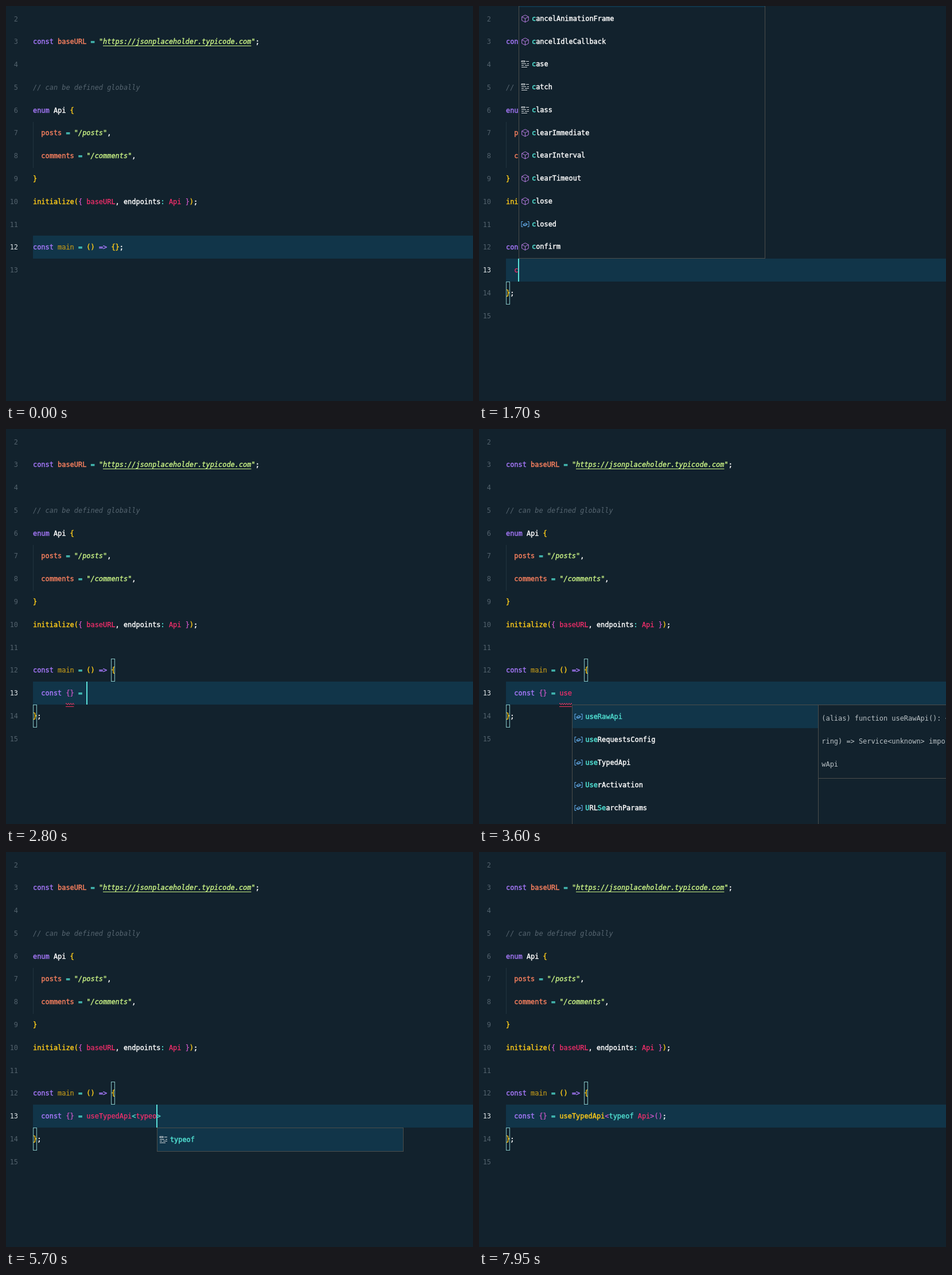
An HTML page that plays this animation: 814x688 px, repeating every 8000 ms.

```html
<!DOCTYPE html>
<html lang="en">
<head>
<meta charset="utf-8">
<title>Typed API editor</title>
<style>
html, body { margin: 0; width: 100%; height: 100%; overflow: hidden; background: #12222d; }
#ed { position: absolute; inset: 0; overflow: hidden; color: #fff; white-space: pre;
  font: 11.93px/41px "DejaVu Sans Mono", monospace; -webkit-text-stroke: .4px currentColor; }
#ed div, #ed svg { position: absolute; box-sizing: border-box; }
b { font-weight: 400; }
.num { left: 0; width: 21px; text-align: right; color: #52616c; -webkit-text-stroke: 0; }
.num.on { color: #dde3e6; }
.line { left: 47px; }
.now { left: 47px; right: 0; height: 40px; background: #113549; }
.guide { left: 47px; top: 202px; width: 1px; height: 79.5px; background: #22343f; }
.pair { width: 7px; height: 40px; border: 1px solid #86c5c5; }
.caret { width: 2px; height: 40px; background: #5ce0d8; }
.k { color: #a678fa; } .o { color: #f9805f; } .c { color: #4fdccf; } .g { color: #ffcc1a; }
.m { color: #b8921a; } .r { color: #fb2f6d; } .p { color: #cf58ca; } .w { color: #fff; }
.m, .r, .p { -webkit-text-stroke-width: .25px; }
.s, .i, .u { color: #c9f285; } .i, .u { font-style: italic; }
.u { text-decoration: underline; text-underline-offset: 2.5px; text-decoration-thickness: 1px; }
.n { color: #566570; font-style: italic; -webkit-text-stroke: 0; }
.pop, .info { background: #12222d; border: 1px solid #4b4d4b; overflow: hidden; }
.pop { width: 430px; }
.row { left: 0; width: 100%; height: 39.77px; padding-left: 22px; }
.row.sel { background: #113549; color: #4fdccf; }
.row svg { left: 3px; top: 13px; }
.row b { color: #4fdccf; -webkit-text-stroke: .55px; }
.row s { color: #a3abb0; }
.bar { right: 0; top: 0; width: 10px; background: #14364b; }
.info { padding: 4px 5px; line-height: 39.8px; color: #b9c1c5; -webkit-text-stroke: 0; }
svg { fill: none; }
</style>
</head>
<body>
<div id="ed"></div>
<script>
const LOOP = 8000, CH = 7.183, ROW = 39.77;
const ed = document.getElementById("ed");
const x = col => 47 + col * CH;
const y = line => 2.6 + (line - 2) * ROW;
const esc = s => s.replace(/&/g, "&amp;").replace(/</g, "&lt;");
const box = (cls, left, top, body = "", css = "") =>
  `<div class="${cls}" style="left:${left}px;top:${top}px;${css}">${body}</div>`;

// Tokens are separated by "~"; the first letter is the colour class.
const paint = src => src.split("~").map(s => `<b class="${s[0]}">${esc(s.slice(1))}</b>`).join("");

const code = {
  3: 'kconst~w ~obaseURL~c = ~s"~uhttps://jsonplaceholder.typicode.com~s"~w;',
  5: "n// can be defined globally",
  6: "kenum~w Api ~g{",
  7: 'w  ~oposts~c = ~s"~i/posts~s"~w,',
  8: 'w  ~ocomments~c = ~s"~i/comments~s"~w,',
  9: "g}",
  10: "ginitialize(~p{ ~rbaseURL~w, endpoints~c: ~rApi~p }~g)~w;"
};

const icons = {
  f: '<path stroke="#b57be0" d="M7.5 .8l5.800 3v6.400l-5.800 3l-5.800-3v-6.400zM1.700 3.800l5.800 3l5.800-3M7.5 6.800v6.400"/>',
  k: '<path stroke="#d5dadd" d="M1 1.500h6v2h-6zM9 2.500h5M1 6.500h8M11 6.500h3M1 9.500h4M7 9.500h7M1 12.500h10"/>',
  v: '<path stroke="#68b4f5" d="M3.500 2.500h-2.500v9h2.500M11.500 2.500h2.500v9h-2.500M4 7.500l4-2.500l3 1.500v1.500l-4 2l-3-1zM4 7.500l3 1l4-2"/>'
};

// Each entry starts with its icon letter; "_" switches match highlighting.
const lists = {
  c: "fcaches fcancelAnimationFrame fcancelIdleCallback kcase kcatch kclass fclearImmediate fclearInterval fclearTimeout fclose vclosed fconfirm",
  co: "vconsole kconst kcontinue fconfirm vcookieStore vConvolverNode vConstantSourceNode vCountQueuingStrategy vCompressionStream vComment vCloseEvent vCryptoKey",
  con: "kconst vconsole kcontinue fconfirm vConvolverNode vConstantSourceNode",
  cons: "kconst vconsole vConstantSourceNode",
  u: "vuseRawApi vuseRequestsConfig vuseTypedApi vundefined funescape vUserActivation vURL vURLSearchParams vUint8Array vUint16Array vUint32Array vUIEvent",
  use: "vuseRawApi vuseRequestsConfig vuseTypedApi vUserActivation v_U_RL_Se_archParams vSuppressedError",
  useT: "vuseTypedApi",
  t: "kthis kthrow ktrue ktry ktypeof vtoolbar vtop vText vTextDecoder vTextEncoder vTouch vTypeError",
  ty: "ktypeof vTypeError ktype v_T_ext_Tr_ack v_T_ouchEvent v_T_reeWalker",
  typeof: "ktypeof",
  Api: "v_Api_ vuseRaw_Api_ vuseTyped_Api_ v_A_ud_i_o_P_aram v_A_ud_i_o_P_aramMap -AudioProcessingEvent v_A_n_i_mation_P_laybackEvent v_A_syncD_i_s_p_osableStack v_A_uthent_i_catorRes_p_onse vOffline_A_ud_i_oCom_p_letionEvent vSVGPreserve_A_s_p_ectRat_i_o v_A_uthent_i_catorAssertionRes_p_onse"
};

const rawInfo = ["(alias) function useRawApi(): <", "ring) => Service<unknown> import", "wApi"];
const typedInfo = ["(alias) function useTypedApi<T", "import useTypedApi"];

const lhs = "w  ~kconst~w ~p{}";
const eq = lhs + "~c = ";
const hook = eq + "~ruseTypedApi";
const typeArg = hook + "~c<typeof ~rApi~c>";
const inner = [[13, 8], [13, 9]], call = [[13, 36], [13, 37]];

// time, line 13, caret column, options
const steps = [
  [1050, "w  ", 2],
  [1500, "w  ~rc", 3, { list: "c", q: 1 }],
  [1750, "w  ~rco", 4, { list: "co", q: 2 }],
  [1900, "w  ~rcon", 5, { list: "con", q: 3, below: 1 }],
  [2000, "w  ~rcons", 6, { list: "cons", q: 4, below: 1 }],
  [2100, "w  ~kconst", 7, { list: "cons", q: 5, below: 1 }],
  [2200, "w  ~kconst~w ", 8],
  [2350, lhs, 9, { pairs: inner, wave: [8, 2] }],
  [2500, lhs, 10, { pairs: inner, wave: [8, 2] }],
  [2600, lhs + "~w ", 11, { wave: [8, 2] }],
  [2700, lhs + "~c =", 12, { wave: [8, 2] }],
  [2750, eq, 13, { wave: [8, 2] }],
  [3000, eq + "~ru", 14, { list: "u", q: 1 }],
  [3050, eq + "~rus", 15, { list: "use", q: 2, below: 1 }],
  [3100, eq + "~ruse", 16, { list: "use", q: 3, below: 1, info: rawInfo, wave: [13, 3] }],
  [3700, eq + "~ruseT", 17, { list: "useT", q: 4, below: 1, info: typedInfo, wave: [13, 4] }],
  [3900, eq + "~ruseTy", 18, { list: "useT", q: 5, below: 1, info: typedInfo, wave: [13, 5] }],
  [4150, hook, 24],
  [4900, hook + "~c<>", 25, { wave: [24, 2] }],
  ...["t", "ty", "typ", "type", "typeo", "typeof"].map((s, i) => [5300 + i * 90, `${hook}~c<~${s == "typeof" ? "c" : "r"}${s}~c>`, 26 + i,
    { list: i > 2 ? "typeof" : i ? "ty" : "t", q: i + 1, below: i > 0 }]),
  [5950, hook + "~c<typeof >", 32, { wave: [32, 1] }],
  [6150, hook + "~c<typeof ~rA~c>", 33, { list: "Api", bar: 1, wave: [33, 1] }],
  [6200, hook + "~c<typeof ~rAp~c>", 34, { list: "Api", bar: 1, wave: [34, 1] }],
  [6250, typeArg, 35, { list: "Api", bar: 1, info: [], wave: [35, 1] }],
  [6850, typeArg, 35, { wave: [35, 1] }],
  [7000, typeArg, 36],
  [7200, typeArg + "~p()", 37, { pairs: call }],
  [7350, typeArg + "~p()", 38, { pairs: call }],
  [7450, typeArg + "~p()~w;", 39, { pairs: call }],
  [7600, eq + "~guseTypedApi~p<~ctypeof ~rApi~p>()~w;", 39]
].map(([t, src, col, opt = {}]) => ({ t, src, col, ...opt }));

// The blink restarts whenever the caret moves.
steps.forEach((s, i) => s.key = i && steps[i - 1].col == s.col ? steps[i - 1].key : s.t);

function label(name, q) {
  if (name.includes("_")) return name.split("_").map((s, i) => i % 2 ? `<b>${s}</b>` : s).join("");
  return q ? `<b>${name.slice(0, q)}</b>${name.slice(q)}` : name;
}

function popup(s) {
  const rows = lists[s.list].split(" "), h = rows.length * ROW + 2;
  const left = x(s.col) + .4, top = s.below ? 480 : 440.2 - h;
  const body = rows.map((r, i) => {
    const old = r[0] == "-", text = label(r.slice(1), s.q);
    const icon = `<svg width="15" height="15">${icons[old ? "v" : r[0]]}</svg>`;
    return box("row" + (i ? "" : " sel"), 0, i * ROW, icon + (old ? `<s>${text}</s>` : text));
  }).join("") + (s.bar ? `<div class="bar" style="height:${371 - top}px"></div>` : "");
  let out = box("pop", left, top, body, `height:${h}px`);
  if (s.info) {
    const tall = s.below ? s.info.length * ROW + 9.6 : 44;
    out += box("info", left + 429, s.below ? top : -1, esc(s.info.join("\n")), `width:300px;height:${tall}px`);
  }
  return out;
}

function wave([col, n]) {
  const w = n * CH;
  return `<svg style="left:${x(col)}px;top:475px" width="${w}" height="10" stroke="#f0355f">
    <path d="M0 4${"q1-3 2 0t2 0".repeat(Math.ceil(w / 4))}M0 8.500h${w}"/></svg>`;
}

function scene(t) {
  const s = steps.findLast(p => p.t <= t);
  const line = s ? 13 : 12, last = s ? 15 : 13;
  const inside = t >= 550;
  const pairs = s ? s.pairs || [[12, 19], [14, 0]] : inside ? [[12, 19], [12, 20]] : [];
  const main = t >= 6150 && t < 6900 ? "g" : "m";
  const head = `kconst~w ~${main}main~c = ~g()~k => ~g{`;
  const lines = { ...code, 12: s ? head : head + "}~w;" };
  if (s) Object.assign(lines, { 13: s.src, 14: "g}~w;" });

  let out = box("now", 47, y(line)) + '<div class="guide"></div>';
  for (let n = 2; n <= last; n++) {
    out += box("num" + (n == line ? " on" : ""), 0, y(n), n);
    if (lines[n]) out += box("line", 47, y(n), paint(lines[n]));
  }
  out += pairs.map(([n, c]) => box("pair", x(c) - .3, y(n))).join("");
  const lit = s ? (t - s.key) % 1000 < 500 : inside;
  if (lit) out += box("caret", x(s ? s.col : 20) - .7, y(line));
  if (s && s.wave) out += wave(s.wave);
  if (s && s.list) out += popup(s);
  return out;
}

let shown = "";
function frame(now) {
  const html = scene(now % LOOP);
  if (html != shown) ed.innerHTML = shown = html;
  requestAnimationFrame(frame);
}
frame(0);
</script>
</body>
</html>
```
